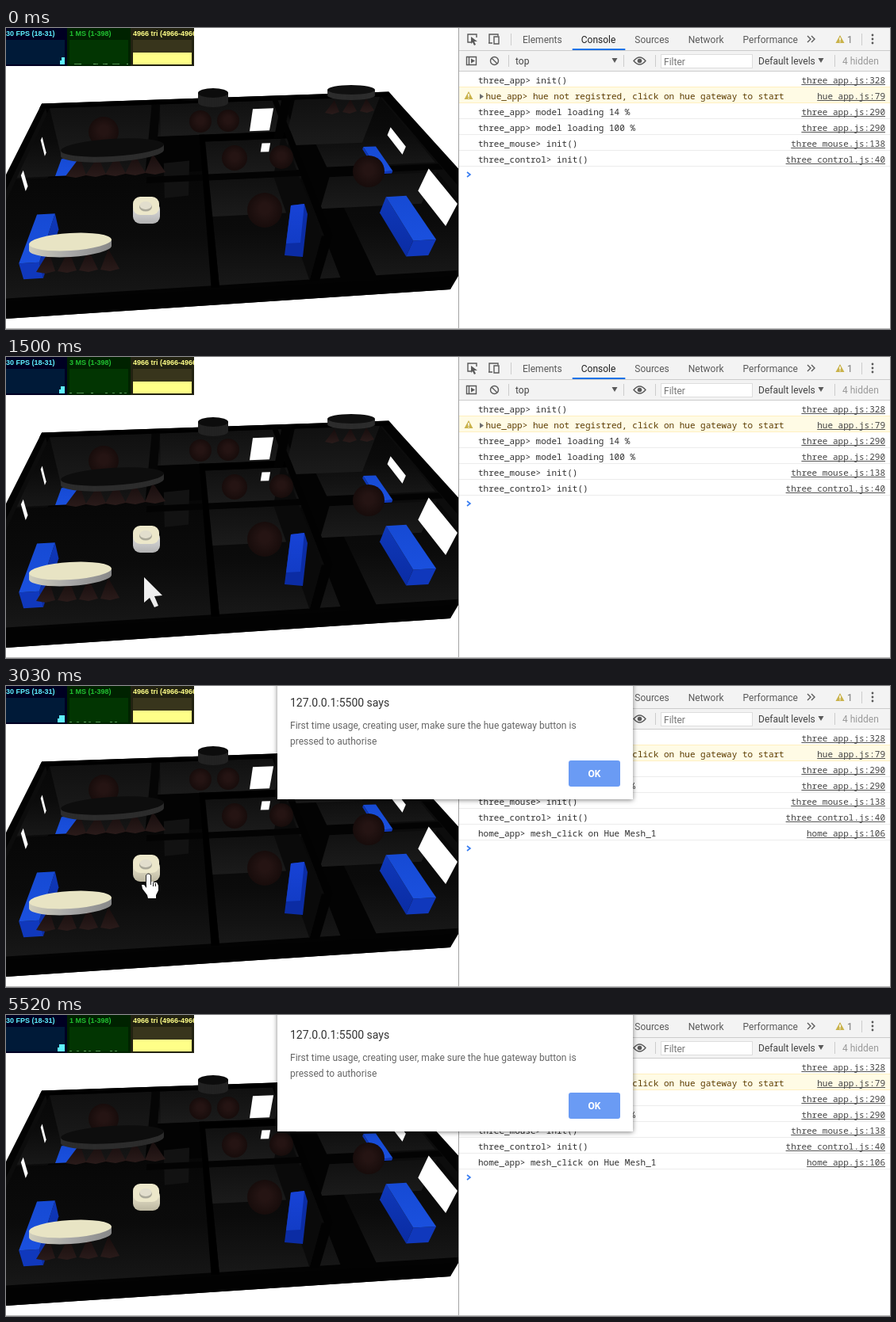
Recreate the animation shown at these times as an HTML page with a canvas. Size 1114 px wide and 380 px high, loop 5.93 s.

```html
<!DOCTYPE html>
<html lang="en">
<head>
<meta charset="utf-8">
<title>Home console</title>
<style>
html, body { margin: 0; height: 100%; overflow: hidden; background: #fff }
canvas { display: block }
</style>
</head>
<body>
<canvas id="stage" width="1114" height="380"></canvas>
<script>
const c = document.getElementById('stage').getContext('2d');
const LOOP = 5930, CLICK = 2700, ALERT = 2970;
const UI = '12px Roboto, sans-serif', MONO = '11px "Noto Sans Mono", monospace', GREY = '#5a5a5a';

const noise = n => { const v = Math.sin(n * 127.1) * 43758.5; return v - Math.floor(v); };

function rect(x, y, w, h, fill) { c.fillStyle = fill; c.fillRect(x, y, w, h); }
function rounded(x, y, w, h, r, fill) {
  c.fillStyle = fill;
  c.beginPath(); c.roundRect(x, y, w, h, r); c.fill();
}
function oval(x, y, rx, ry, fill, tilt = 0) {
  c.fillStyle = fill;
  c.beginPath(); c.ellipse(x, y, rx, ry, tilt, 0, 7); c.fill();
}
function path(d, fill) { c.fillStyle = fill; c.fill(new Path2D(d)); }
function stroke(d, color = GREY, width = 1.4) {
  c.strokeStyle = color; c.lineWidth = width;
  c.stroke(new Path2D(d));
}
function text(s, x, y, color, font = UI, align = 'left') {
  c.font = font; c.fillStyle = color; c.textAlign = align;
  c.fillText(s, x, y);
}
function fade(x0, y0, x1, y1, ...colors) {
  const g = c.createLinearGradient(x0, y0, x1, y1);
  colors.forEach((k, i) => g.addColorStop(i / Math.max(1, colors.length - 1), k));
  return g;
}
// polygon shaded from its top to its bottom
function shape(points, ...colors) {
  const ys = points.map(p => p[1]);
  path('M' + points.join('L') + 'Z', fade(0, Math.min(...ys), 0, Math.max(...ys), ...colors));
}

// perspective: u across, v towards the viewer, drop below the wall tops
function plan(u, v, drop = 0) {
  const x = 215 + (u - 215) * (v + 230) / 320;
  const slant = .034 + (v - 88) * .000122;
  return [x - (x - 215) * .0015 * drop, v - (x - 264) * slant + drop];
}
const flat = (u0, v0, u1, v1, ...colors) =>
  shape([plan(u0, v0), plan(u1, v0), plan(u1, v1), plan(u0, v1)], ...colors);
const upright = (u0, v0, u1, v1, height, ...colors) =>
  shape([plan(u0, v0), plan(u1, v1), plan(u1, v1, height), plan(u0, v0, height)], ...colors);

function room(u0, v0, u1, v1, height) {
  flat(u0, v0, u1, v1, '#070707', '#0b0b0b', '#181818');
  if (height) upright(u0, v0, u1, v0, height, '#101010', '#1b1b1b');
}
function blueBox(u0, v0, u1, v1, height) {
  const inner = u0 < 215 ? u1 : u0;
  upright(inner, v0, inner, v1, height, '#0f38b8', '#0a2ca4');
  upright(u0, v1, u1, v1, height, '#1038bc');
  flat(u0, v0, u1, v1, '#164ad4', '#1a50de');
}
function sphere(x, y, r) {
  const g = c.createRadialGradient(x, y - r * .1, r * .3, x, y, r);
  g.addColorStop(0, '#251413'); g.addColorStop(1, '#170c0b');
  oval(x, y, r, r, g);
}
function cones(count, x, y, gap, w, h) {
  for (let i = 0; i < count; i++) {
    const cx = x + i * gap, cy = y - i, lean = (count / 2 - i) * 2;
    shape([[cx + lean, cy], [cx + w, cy + h - 3], [cx, cy + h], [cx - w, cy + h - 2]], '#160c0c', '#2a1b1a');
  }
}
function lamp(x, y, rx, ry, depth, top, side, tilt = 0) {
  for (let i = depth; i > 0; i--) oval(x, y + i, rx, ry, side, tilt);
  oval(x, y, rx, ry, top, tilt);
}

function house(clicked) {
  rect(0, 0, 570, 380, '#fff');
  shape([plan(44, 88), plan(484, 88), plan(484, 250), [560, 330], [0, 367], plan(44, 350)], '#030303');

  upright(52, 94, 52, 320, 60, '#0c0c0c');
  upright(470, 94, 470, 270, 60, '#0c0c0c');
  room(57, 94, 184, 178, 62);
  room(194, 94, 346, 134, 40);
  room(362, 94, 468, 182, 58);
  room(245, 143, 337, 184, 42);
  room(57, 180, 241, 325, 0);
  room(246, 192, 334, 325, 46);
  room(360, 195, 462, 325, 40);
  upright(202, 168, 228, 166, 44, '#121212');

  // wall tops and the dividers below them
  upright(332, 134, 332, 270, 56, '#0a0a0a');
  upright(332, 270, 341, 270, 58, '#020202');
  flat(44, 88, 484, 94, '#000');
  flat(184, 94, 194, 160, '#050505');
  flat(240, 134, 341, 143, '#000');
  flat(186, 184, 470, 192, '#030303');
  flat(240, 134, 246, 328, '#000');
  flat(334, 90, 341, 270, '#020202');
  upright(348, 90, 360, 90, 52, '#020202');
  shape([[0, 345], [561, 313], [560, 330], [0, 367]], '#020202');

  // windows
  upright(307, 104, 332, 104, 28, '#fff');
  upright(306, 148, 315, 148, 11, '#fff');
  upright(457, 190, 457, 238, 28, '#fff');
  upright(452, 134, 452, 160, 10, '#fff');
  upright(60, 169, 60, 175, 20, '#fff');
  upright(64, 129, 64, 133, 20, '#fff');

  blueBox(95, 157, 112, 178, 0);
  blueBox(409, 158, 422, 191, 3);
  blueBox(91, 224, 107, 283, 20);
  blueBox(401, 224, 419, 283, 20);
  shape([[359, 224], [376, 222], [380, 235], [374, 289], [351, 287]], '#0b2ca4');
  shape([[359, 224], [376, 222], [371, 271], [353, 272]], '#1743d6', '#123cc6');

  sphere(123, 131, 19);
  sphere(245, 118, 14);
  sphere(280, 117, 14);
  sphere(288, 164, 16);
  sphere(347, 163, 15);
  sphere(457, 181, 20);
  sphere(326, 230, 22);

  cones(5, 88, 163, 25, 13, 26);
  cones(4, 50, 282, 27, 12, 28);
  cones(3, 411, 91, 22, 9, 18);
  lamp(134, 151, 65, 11, 7, '#0d0d0d', '#2c2c2c', -.06);
  lamp(81, 270, 52, 11, 8, '#e8e4c4', fade(29, 0, 133, 0, '#cfcdbb', '#a8a8a8', '#888'), -.06);
  lamp(261, 82, 19, 6, 12, '#0c0c0c', '#222');
  lamp(435, 78, 30, 6, 7, '#101010', '#2c2c2c');

  // gateway
  const side = clicked ? ['#eae5cc', '#bdb8a2'] : ['#ddd', '#b4b4b4'];
  rounded(160, 220, 34, 27, 9, fade(0, 225, 0, 246, ...side));
  rounded(160, 213, 33, 23, 9, '#ece7ca');
  oval(176, 226, 8, 5.5, '#aaa899');
  oval(176, 224, 7.5, 5, '#e2decd');
}

function stats(t) {
  const live = Math.min(t, 3030); // the alert halts rendering
  const ms = 1 + Math.floor(live / 690) % 4;
  function panel(i, label, ink, back, graph) {
    const x = i * 80 - 3;
    c.save();
    c.beginPath(); c.rect(x, 0, 80, 48); c.clip();
    rect(x, 0, 80, 48, back);
    rect(x + 3, 15, 74, 31, graph);
    text(label, x + 3, 10, ink, 'bold 9px Arial, "Liberation Sans", sans-serif');
    c.restore();
  }
  panel(0, '30 FPS (18-31)', '#5ff0ff', '#002', '#001a38');
  panel(1, ms + ' MS (1-398)', '#20c030', '#020', '#023502');
  panel(2, '4966 tri (4966-4966)', '#ffff88', '#221', '#38351c');
  const left = 68 - Math.floor(live / 1000);
  rect(left, 41, 3, 5, '#5ff0ff');
  rect(left + 2, 37, 72 - left, 9, '#5ff0ff');
  for (let i = 0; i < 74; i++) {
    const v = noise(Math.floor((i + live * .03) / 3));
    if (v > .7) rect(80 + i, 45, 1, 1, `rgba(150,230,150,${v * .7})`);
  }
  rect(160, 31, 74, 15, '#ffff88');
}

function warning(x, y) {
  path(`M${x} ${y - 5}l5.500 10h-11z`, '#c9b24a');
  rect(x - .7, y - 2, 1.5, 4, '#fff');
  rect(x - .7, y + 3, 1.5, 1, '#fff');
}
const downArrow = (x, y) => path(`M${x} ${y + 3}l-3.500-6h7z`, GREY);

function toolbar() {
  rect(571, 0, 543, 55, '#f3f3f3');
  rect(571, 28, 543, 1, '#ccc');
  rect(571, 54, 543, 1, '#ccc');
  for (const x of [636, 1078]) rect(x, 7, 1, 15, '#ccc');
  for (const x of [633, 778, 818, 1044]) rect(x, 34, 1, 15, '#ccc');

  let x = 651;
  for (const name of ['Elements', 'Console', 'Sources', 'Network', 'Performance']) {
    const active = name == 'Console';
    text(name, x, 19, active ? '#222' : GREY);
    const w = c.measureText(name).width;
    if (active) rect(x - 11, 26, w + 23, 2, '#1a73e8');
    x += w + 24;
  }
  stroke('M1010 10l4 4l-4 4M1015 10l4 4l-4 4');
  warning(1051, 14);
  text('1', 1060, 19, '#777');
  for (let y = 9; y < 20; y += 5) oval(1092, y, 1.4, 1.4, GREY);
  stroke('M586 18h-4v-10h11v4');
  path('M586 11l8 6h-4l2 4l-2 1l-2-4l-2 2z', GREY);
  stroke('M609 19v-11h11v2M608 19h5M615 11h6v9h-6z');

  stroke('M580.500 36.500h12v10h-12zM583.500 36v11');
  path('M586 38.500l5 3l-5 3z', GREY);
  stroke('M620.500 41.500a5 5 0 1 1-10 0a5 5 0 1 1 10 0M612 38l7 7');
  text('top', 642, 46, '#444');
  downArrow(767, 41);
  stroke('M791 41.500q7.500-9 15 0q-7.500 9-15 0z');
  oval(798.5, 41.5, 2.8, 2.8, GREY);
  rect(825, 33, 116, 18, '#ddd');
  rect(826, 34, 114, 16, '#fff');
  text('Filter', 829, 47, '#777');
  text('Default levels', 948, 46, '#444');
  downArrow(1027, 41);
  text('4 hidden', 1054, 46, '#999');
}

function devtools(clicked) {
  rect(570, 0, 544, 380, '#fff');
  toolbar();
  rect(570, 0, 1, 380, '#a3a3a3');
  const log = [
    ['three_app> init()', 'three_app.js:328'],
    ['hue_app> hue not registred, click on hue gateway to start', 'hue_app.js:79'],
    ['three_app> model loading 14 %', 'three_app.js:290'],
    ['three_app> model loading 100 %', 'three_app.js:290'],
    ['three_mouse> init()', 'three_mouse.js:138'],
    ['three_control> init()', 'three_control.js:40']
  ];
  if (clicked) log.push(['home_app> mesh_click on Hue Mesh_1', 'home_app.js:106']);
  log.forEach(([message, link], i) => {
    const y = 70 + i * 20, warn = i == 1;
    if (warn) {
      rect(571, y - 15, 543, 20, '#fffbe5');
      warning(583, y - 5);
      path(`M597 ${y - 7}l5 3.500l-5 3.500z`, '#6e6e6e');
    }
    rect(571, y + 4, 543, 1, i < 2 ? '#fff0c0' : '#ececec');
    text(message, warn ? 604.5 : 595, y, warn ? '#5c3c00' : '#303030', MONO);
    text(link, 1108, y, '#444', MONO, 'right');
    const w = c.measureText(link).width;
    rect(1108 - w, y + 1, w, 1, '#555');
  });
  stroke(`M581 ${62 + log.length * 20}l4 3l-4 3`, '#367cf1', 1.6);
  rect(0, 379, 1114, 1, '#b8b8b8');
}

function dialog(age) {
  c.save();
  c.translate(0, -Math.round(60 * Math.exp(-age / 22)));
  c.shadowColor = 'rgba(0,0,0,.5)'; c.shadowBlur = 6; c.shadowOffsetY = 1;
  rect(342, -20, 448, 167, '#fff');
  c.shadowColor = 'transparent';
  text('127.0.0.1:5500 says', 358, 30, '#333', '14px Roboto, sans-serif');
  text('First time usage, creating user, make sure the hue gateway button is', 358, 58, '#666');
  text('pressed to authorise', 358, 78, '#666');
  rounded(709, 98, 65, 33, 3, '#6a9bf4');
  text('OK', 741.5, 119, '#fff', 'bold 12px Roboto, sans-serif', 'center');
  c.restore();
}

// pointer waypoints: time, x, y
const route = [
  [370, 925, 370], [660, 837, 270], [1030, 388, 308], [1300, 175, 297], [1920, 171, 237], [3240, 171, 237],
  [3420, 285, 300], [3660, 669, 154], [3860, 729, 125], [5200, 729, 125], [5520, 1000, 390]
];

function pointer(t) {
  const next = route.findIndex(p => p[0] > t);
  if (next < 1) return;
  const [t0, x0, y0] = route[next - 1], [t1, x1, y1] = route[next], k = (t - t0) / (t1 - t0);
  c.save();
  c.translate(Math.round(x0 + (x1 - x0) * k), Math.round(y0 + (y1 - y0) * k));
  if (t >= 1920 && t < 3240) {
    path('M6 1l2-1l3 2v8h3l2 1h3l2 4v6l-3 6v4h-10l-1-4l-6-8l-1-5h3l3 4z', '#fff');
    stroke('M5.500 14v-12l2-2h2l2 2v12M14.500 11v5M17.500 12v4', '#222', 1);
  } else {
    c.globalCompositeOperation = 'difference';
    path('M0 0v32l7-6l6 12l5-2l-5-12l10-1z', '#fff');
  }
  c.restore();
}

function draw(now) {
  const t = now % LOOP, clicked = t >= CLICK;
  house(clicked);
  stats(t);
  devtools(clicked);
  if (clicked && t < ALERT) { // focus ring of the page
    rect(237, 0, 333, 1, '#8ab4f8');
    rect(570, 0, 1, 380, '#8ab4f8');
  }
  if (t >= ALERT) dialog(t - ALERT);
  pointer(t);
  requestAnimationFrame(draw);
}
requestAnimationFrame(draw);
</script>
</body>
</html>
```
